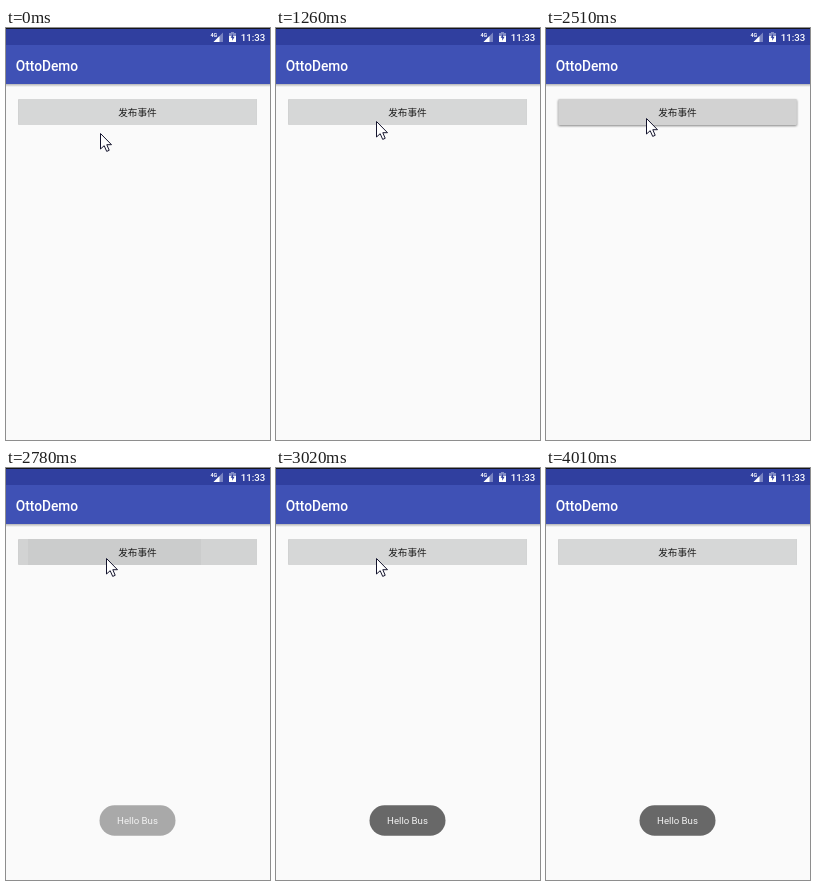
An HTML page that plays this animation: 264x412 px, repeating every 4.28 s.

```html
<!DOCTYPE html>
<html lang="zh">
<head>
<meta charset="utf-8">
<title>OttoDemo</title>
<style>
  html, body { margin: 0; height: 100%; overflow: hidden; background: #fafafa; }
  svg { display: block; width: 100vw; height: 100vh; }
  text { font-family: Roboto, "Noto Sans CJK SC", "Noto Sans CJK", sans-serif; font-size: 9.63px; }
  .white { fill: #fff; }
  .medium { font-weight: 500; }
  #button { fill: #d6d7d7; filter: drop-shadow(0 .7px .6px rgba(0, 0, 0, .3)); }
  #button.pressed { fill: #d2d2d2; filter: drop-shadow(0 1.2px 1.2px rgba(0, 0, 0, .48)); }
</style>
</head>
<body>
<svg viewBox="0 0 264 412">
  <defs>
    <linearGradient id="shade" x2="0" y2="1">
      <stop stop-opacity=".28"/>
      <stop offset="1" stop-opacity="0"/>
    </linearGradient>
  </defs>
  <rect width="264" height="412" fill="#fafafa"/>

  <!-- status and app bars -->
  <rect width="264" height="17" fill="#303f9f"/>
  <rect width="264" height="1" fill="#15161c"/>
  <rect y="17" width="264" height="39" fill="#3f51b5"/>
  <rect y="56" width="264" height="3" fill="url(#shade)"/>
  <text class="white medium" x="204.5" y="8.6" style="font-size:5.4px;font-weight:700">4G</text>
  <path d="M217 4.5V14H207.5Z" fill="#fff" opacity=".35"/>
  <path d="M213.5 8V14H207.5Z" class="white"/>
  <path d="M225 4h3v1h2v9h-7V5h2Z" fill="#fff" opacity=".4"/>
  <path d="M223 8h7v6h-7Z" class="white"/>
  <path d="M227 5.8l-2.4 4h1.6v2.9l2.4-4H227Z" fill="#303f9f"/>
  <text class="white medium" x="234.7" y="13">11:33</text>
  <text class="white medium" x="9.7" y="42.6" style="font-size:13.75px">OttoDemo</text>

  <rect id="button" x="12.3" y="71" width="238.6" height="26" rx="1.3"/>
  <g id="ripple">
    <rect x="12.5" y="71" width="238" height="26" rx="1.3" opacity=".02"/>
    <rect x="22" y="71" width="173" height="26" opacity=".03"/>
  </g>
  <text class="medium" x="131.5" y="87.8" text-anchor="middle" fill="#000" fill-opacity=".87">发布事件</text>

  <g id="toast">
    <rect x="93.5" y="337.3" width="76" height="30.4" rx="15.2"/>
    <text x="131.5" y="356.2" text-anchor="middle" fill="#f3f3f3">Hello Bus</text>
  </g>

  <path id="cursor" d="M.5.5V16L4.2 12.7 6.7 18.4 9.2 17.3 6.8 11.7H11.5Z" fill="#fff" stroke="#15152e"/>
</svg>
<script>
const LOOP = 4280;
const el = id => document.getElementById(id);
const [button, ripple, toast, cursor] = ["button", "ripple", "toast", "cursor"].map(el);
const toastBox = toast.querySelector("rect");

// [start ms, tip x, tip y]
const moves = [
  [0, 94, 105], [870, 98, 100], [990, 99, 97], [1110, 99, 95],
  [1260, 100, 93], [1380, 100, 91], [1530, 100, 90],
  [3170, 101, 91], [3320, 118, 142], [3440, 150, 213], [3590, 196, 316],
  [3740, 222, 373], [3860, 235, 408], [4010, 264, 412]
];
// [start ms, level]
const rippleLevels = [[0, 0], [2780, 1], [2900, .5], [3020, 0]];
const toastGreys = [[0, 250], [2780, 169], [2900, 130], [3020, 104]];

const at = (steps, t) => steps.filter(s => s[0] <= t).pop();

function draw(now) {
  const t = now % LOOP;
  const [, x, y] = at(moves, t);
  const grey = at(toastGreys, t)[1];
  cursor.setAttribute("transform", `translate(${x} ${y})`);
  button.setAttribute("class", t >= 2510 && t < 2780 ? "pressed" : "");
  ripple.setAttribute("opacity", at(rippleLevels, t)[1]);
  toast.setAttribute("visibility", t >= 2780 ? "visible" : "hidden");
  toastBox.setAttribute("fill", `rgb(${grey},${grey},${grey})`);
}

const start = performance.now();
function tick() {
  draw(performance.now() - start);
  requestAnimationFrame(tick);
}
tick();
</script>
</body>
</html>
```
